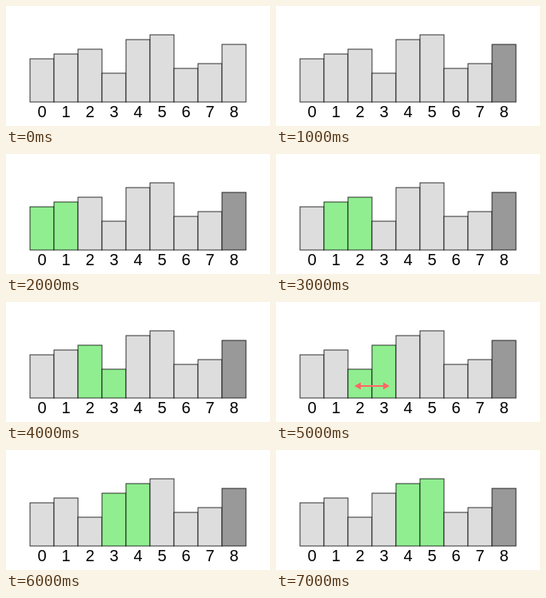
Recreate the animation shown at these times as an HTML page. Size 330 by 150 pixels, loop 8000 ms.

```html
<!DOCTYPE html>
<html lang="en">
<head>
<meta charset="utf-8">
<title>Bubble sort</title>
<style>
  html, body { margin: 0; width: 100%; height: 100%; overflow: hidden; background: #fff; }
  svg { display: block; width: 330px; height: 150px; }
  rect { stroke: #000; stroke-opacity: .8; stroke-width: 1; }
  text { font: 20px "Liberation Sans", Arial, sans-serif; text-anchor: middle; fill: #000; }
  .arrow { fill: none; stroke: #ff6666; stroke-width: 2; }
  .heads { fill: #ff6666; }
</style>
</head>
<body>
<svg viewBox="0 0 330 150">
  <g id="bars"></g>
  <g id="swap">
    <path class="arrow" d="M-18 105H18"/>
    <path class="heads" d="M-22 105l8-4.5v9zM22 105l-8-4.5v9z"/>
  </g>
</svg>
<script>
const STEP = 1000, UNIT = 6, WIDTH = 30, LEFT = 30, BASE = 120;
const PLAIN = '#dddddd', ACTIVE = '#90ee90', DONE = '#999999';
const start = [9, 10, 11, 6, 13, 14, 7, 8, 12];

// pair: left index of the compared bars; swapped: show the exchange
const steps = [
  { sorted: 9 },
  { sorted: 8 },
  { sorted: 8, pair: 0 },
  { sorted: 8, pair: 1 },
  { sorted: 8, pair: 2 },
  { sorted: 8, pair: 2, swapped: true },
  { sorted: 8, pair: 3 },
  { sorted: 8, pair: 4 }
];

let values = start;
for (const step of steps) {
  if (step.swapped) {
    values = [...values];
    const i = step.pair;
    [values[i], values[i + 1]] = [values[i + 1], values[i]];
  }
  step.values = values;
}

function add(parent, name, attrs) {
  const el = document.createElementNS('http://www.w3.org/2000/svg', name);
  for (const key in attrs) el.setAttribute(key, attrs[key]);
  return parent.appendChild(el);
}

const group = document.getElementById('bars');
const swap = document.getElementById('swap');
const bars = start.map((_, i) => {
  const x = LEFT + i * WIDTH;
  add(group, 'text', { x: x + WIDTH / 2, y: 139 }).textContent = i;
  return add(group, 'rect', { x, width: WIDTH });
});

function show({ values, sorted, pair, swapped }) {
  bars.forEach((bar, i) => {
    const height = values[i] * UNIT;
    const active = i === pair || i === pair + 1;
    bar.setAttribute('y', BASE - height);
    bar.setAttribute('height', height);
    bar.setAttribute('fill', i >= sorted ? DONE : active ? ACTIVE : PLAIN);
  });
  swap.setAttribute('visibility', swapped ? 'visible' : 'hidden');
  if (swapped) swap.setAttribute('transform', `translate(${LEFT + (pair + 1) * WIDTH})`);
}

let current = -1;
const begin = performance.now();
function tick() {
  const next = Math.floor((performance.now() - begin) / STEP) % steps.length;
  if (next !== current) show(steps[current = next]);
  requestAnimationFrame(tick);
}
tick();
</script>
</body>
</html>
```
